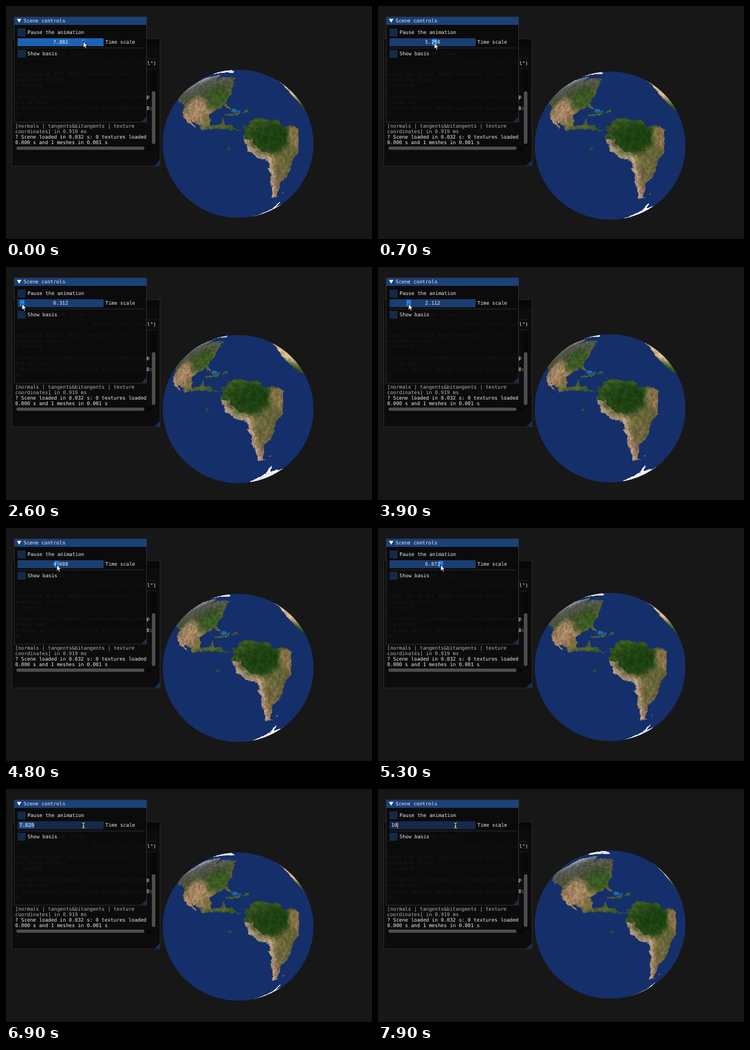
Write an HTML page with a canvas that moves like this. It is 600 px wide and 383 px high and loops after 8000 ms.

```html
<!DOCTYPE html>
<html lang="en">
<head>
<meta charset="utf-8">
<title>Scene controls</title>
<style>
html, body { margin: 0; width: 100%; height: 100%; overflow: hidden; background: #171717; }
canvas, svg { position: absolute; left: 0; top: 0; width: 600px; height: 383px; }
text { font: 8.14px "DejaVu Sans Mono", monospace; fill: #efefef; text-rendering: geometricPrecision; white-space: pre; }
.log .soft { fill: #b4b4b4; }
</style>
</head>
<body>
<canvas id="globe" width="600" height="383"></canvas>
<svg viewBox="0 0 600 383" xmlns="http://www.w3.org/2000/svg">
  <rect y="381" width="600" height="2" fill="#1b1216"/>

  <g class="log">
    <rect x="9.5" y="54" width="243" height="209" fill="#0c0c0c" stroke="#2b2b31"/>
    <rect x="10" y="54.5" width="242" height="12" fill="#080808"/>
    <text x="15" y="63.5">Log</text>
    <text x="67" y="80.5">bottom  Clear</text>
    <text x="143.5" y="97">Filter ("incl,-excl")</text>
    <path d="M15 86.5H247M15 103.5H247" stroke="#1d1d20"/>
    <text x="15" y="115">ready the 32_BIT_INDEX extension is not</text>
    <text x="15" y="124.2">available either.</text>
    <text x="15" y="133.4">? Loading</text>
    <text x="15" y="152.2">'scenes/mixing/thematic/surface/elements/obsp</text>
    <text x="15" y="161.4">ere at 0x1':</text>
    <text x="15" y="170.8">? Scene parsed, vertex count and bounds are 0:</text>
    <text x="15" y="180">ms</text>
    <text class="soft" x="15" y="199.6">[normals | tangents&amp;bitangents | texture</text>
    <text class="soft" x="15" y="208.7">coordinates] in 0.919 ms</text>
    <text x="15" y="218">? Scene loaded in 0.032 s: 0 textures loaded</text>
    <text x="15" y="227.4">0.000 s and 1 meshes in 0.001 s</text>
    <rect x="238" y="104" width="8.5" height="126" fill="#070707"/>
    <rect x="239" y="140" width="6" height="87" rx="3" fill="#4d4d4d"/>
    <rect x="15" y="230" width="223" height="8" fill="#070707"/>
    <rect x="17" y="231" width="210" height="5.5" rx="2.7" fill="#4d4d4d"/>
    <path d="M252 253.5V262.5H243Z" fill="#172f50"/>
  </g>

  <rect x="13.5" y="18" width="217" height="173" fill="#0b0b0b" fill-opacity=".94" stroke="#2f2f37"/>
  <rect x="14" y="18" width="216.5" height="13" fill="#1b4178"/>
  <path d="M18 21.3H25.2L21.6 27.6Z" fill="#fff"/>
  <text x="28.8" y="27.4">Scene controls</text>
  <rect x="19" y="37" width="13" height="13" fill="#152a48"/>
  <text x="35.3" y="46.4">Pause the animation</text>
  <rect id="frame" x="19" y="53" width="141" height="13"/>
  <rect id="grab" y="54.3" width="7.2" height="10.4"/>
  <rect id="pick" x="21.5" y="54.5" width="25" height="10" fill="#27568f"/>
  <text id="value" y="62.4"></text>
  <path id="caret" d="M0 55V64.5" stroke="#f2f2f2" stroke-width=".8"/>
  <text x="162.8" y="62.4">Time scale</text>
  <path d="M19 69H227" stroke="#2d2d34"/>
  <rect x="19" y="72" width="13" height="13" fill="#152a48"/>
  <text x="35.3" y="81.4">Show basis</text>
  <path d="M230 182V190.5H221.5Z" fill="#172f50"/>

  <path id="arrow" d="M0 0V10.6L2.4 8.4L4 12.1L5.8 11.3L4.2 7.7H7.5Z" fill="#fff" stroke="#000"/>
  <g id="beam" fill="none" stroke="#000" stroke-width="2.4">
    <path id="bar" d="M124.5 55.5Q127 55.5 127 57V63Q127 64.5 124.5 64.5M129.5 55.5Q127 55.5 127 57M127 63Q127 64.5 129.5 64.5M125.7 61H128.3"/>
    <g stroke="#fff" stroke-width="1"><use href="#bar"/></g>
  </g>
</svg>
<script>
const $ = id => document.getElementById(id);
const LOOP = 8000, DEG = Math.PI / 180;

// ---- Earth map: coarse lon, lat outlines, roughened by noise ----
const MW = 1080, MH = 540, OCEAN = [21, 47, 107];
const NORTH = [-168,66, -128,70, -95,74, -62,66, -78,58, -65,60, -56,52, -66,44, -76,35, -81,31, -80,25, -83,30,
  -96,29, -98,20, -91,18, -87,21, -88,16, -83,15, -82,9, -77,8, -86,11, -94,16, -105,20, -113,31, -110,23,
  -121,35, -124,48, -152,59];
const SOUTH = [-77,8, -72,12, -62,10.5, -51,4, -50,0, -40,-3, -35,-6, -39,-14, -41,-22, -48,-26, -53,-33, -57,-38,
  -62,-40, -66,-47, -69,-51, -65,-55, -74,-52, -73,-37, -70,-19, -76,-14, -81,-5, -80,1];
const AFRICA = [-6,36, -17,21, -17,14, -8,4.5, 9,4, 20,36];
const GREENLAND = [-45,60, -55,70, -70,78, -30,83, -20,72];
const ANTARCTICA = [-180,-78, -75,-73, -58,-63, -62,-72, -20,-77, 180,-72, 180,-90, -180,-90];
const ANTILLES = [-84,22.5, -75,20.3, -68,18.5];

// land colours at even steps from 80 N to 56 S
const BELTS = ['#e4e8ea', '#555a55', '#4a5436', '#94794f', '#36571f', '#3a5223', '#6f6a3c', '#6f653f', '#7d6550'];

const mapX = lon => (lon + 180) * 3, mapY = lat => (90 - lat) * 3;

function hash(x, y) {
  let h = Math.imul(x, 374761393) ^ Math.imul(y, 668265263);
  h = Math.imul(h ^ (h >>> 13), 1274126177);
  return ((h ^ (h >>> 16)) >>> 0) / 4294967296;
}

function noise(x, y) {
  const i = Math.floor(x), j = Math.floor(y);
  let u = x - i, v = y - j;
  u *= u * (3 - 2 * u);
  v *= v * (3 - 2 * v);
  const a = hash(i, j), b = hash(i + 1, j), c = hash(i, j + 1), d = hash(i + 1, j + 1);
  return a + (b - a) * u + (c - a + (a - b - c + d) * u) * v;
}

function paintMap() {
  const c = document.createElement('canvas');
  c.width = MW;
  c.height = MH;
  const g = c.getContext('2d');
  const trace = pts => {
    g.beginPath();
    for (let i = 0; i < pts.length; i += 2) g.lineTo(mapX(pts[i]), mapY(pts[i + 1]));
  };
  const fill = (pts, style) => {
    trace(pts);
    g.fillStyle = style;
    g.fill();
  };
  const stroke = (pts, style, width) => {
    trace(pts);
    g.strokeStyle = style;
    g.lineWidth = width;
    g.stroke();
  };
  const blob = (color, lon, lat, rx, ry) => {
    g.save();
    g.translate(mapX(lon), mapY(lat));
    g.scale(rx * 3, ry * 3);
    const grad = g.createRadialGradient(0, 0, 0, 0, 0, 1);
    grad.addColorStop(0, color);
    grad.addColorStop(.6, color + 'd0');
    grad.addColorStop(1, color + '00');
    g.fillStyle = grad;
    g.fillRect(-1, -1, 2, 2);
    g.restore();
  };

  const belts = g.createLinearGradient(0, mapY(80), 0, mapY(-56));
  BELTS.forEach((color, i) => belts.addColorStop(i / (BELTS.length - 1), color));
  for (const land of [NORTH, SOUTH, AFRICA]) fill(land, belts);
  g.setLineDash([27, 6]);
  stroke(ANTILLES, '#47602f', 4);
  g.setLineDash([]);
  g.fillRect(mapX(-92), mapY(.5), 4, 4);
  g.fillRect(mapX(-61), mapY(-51), 7, 3);

  g.globalCompositeOperation = 'source-atop';
  blob('#a98866', -109, 36, 16, 15);
  blob('#35571f', -84, 38, 16, 13);
  blob('#1f4412', -63, -4, 20, 13);
  blob('#1b3f10', -57, -6, 11, 10);
  blob('#8d734a', -41, -11, 9, 11);
  blob('#94745a', -69, -45, 7, 11);
  blob('#dfbd90', 0, 24, 30, 16);
  const andes = SOUTH.slice(-12);
  stroke(andes, '#9c805ca0', 32);
  stroke(andes, '#c9b49c80', 18);

  g.globalCompositeOperation = 'source-over';
  for (const ice of [GREENLAND, ANTARCTICA]) fill(ice, '#eef1f4');
  g.globalCompositeOperation = 'destination-over';
  blob('#2377a6', -77.5, 24, 2, 2);
  blob('#1c6196', -75, 22, 2, 1.2);
  return g.getImageData(0, 0, MW, MH).data;
}

// roughen coasts and mottle the land
function buildMap() {
  const src = paintMap(), out = new Uint8ClampedArray(MW * MH * 3);
  const wobble = (x, y) => (noise(x * .3, y * .3) - .5) * 4 + (noise(x * .1, y * .1) - .5) * 6;
  const clamp = (v, max) => Math.min(max, Math.max(0, Math.round(v)));
  for (let y = 0, o = 0; y < MH; y++) for (let x = 0; x < MW; x++, o += 3) {
    const sx = clamp(x + wobble(x, y), MW - 1), sy = clamp(y + wobble(x + 500, y), MH - 1);
    const i = (sy * MW + sx) * 4, a = src[i + 3] / 255;
    const shade = a ? .74 + .36 * noise(x * .18, y * .18 + 40) + .14 * hash(x, y) : 1;
    for (let k = 0; k < 3; k++) out[o + k] = OCEAN[k] * (1 - a) + src[i + k] * a * shade;
  }
  return out;
}

// ---- Globe ----
const CX = 380.5, RX = 123.5, RY = 121.7, DIST = 8, K2 = DIST * DIST - 1;
const LON0 = -84.7, ROLL = 23.4 * DEG, TILT = .5 * DEG, SPIN = [.2, .979, -.03];

function turn([x, y, z], a) {
  const c = Math.cos(a), s = Math.sin(a), t = 1 - c;
  return [[t*x*x + c, t*x*y - s*z, t*x*z + s*y],
          [t*x*y + s*z, t*y*y + c, t*y*z - s*x],
          [t*x*z - s*y, t*y*z + s*x, t*z*z + c]];
}
const mul = (a, b) => a.map(r => [0, 1, 2].map(j => r[0]*b[0][j] + r[1]*b[1][j] + r[2]*b[2][j]));
const POSE = mul(turn([0, 0, 1], ROLL), turn([1, 0, 0], TILT));

const earth = buildMap();
const ctx = $('globe').getContext('2d');
const X0 = 255, BW = 252, BH = 250;
const image = ctx.createImageData(BW, BH);

// cast a ray through each pixel and look the hit point up on the map
function drawGlobe(angle) {
  const cy = 226.5 - .46 * angle, y0 = Math.floor(cy) - 125;
  const [a, b, c] = mul(turn(SPIN, angle * DEG), POSE);
  const px = image.data;
  for (let j = 0, o = 0; j < BH; j++) for (let i = 0; i < BW; i++, o += 4) {
    let x = (X0 + i + .5 - CX) / RX, y = (cy - y0 - j - .5) / RY;
    const r = Math.hypot(x, y), cover = (1 - r) * 122 + .5;
    px[o + 3] = Math.max(0, Math.min(1, cover)) * 255;
    if (cover <= 0) continue;
    if (r > .9999) { x *= .9999 / r; y *= .9999 / r; }
    const q = 1 + (x * x + y * y) / K2;
    const t = (DIST - Math.sqrt(Math.max(0, DIST * DIST - q * K2))) / q;
    const k = t / Math.sqrt(K2), z = DIST - t;
    x *= k;
    y *= k;
    const ex = a[0]*x + b[0]*y + c[0]*z, ey = a[1]*x + b[1]*y + c[1]*z, ez = a[2]*x + b[2]*y + c[2]*z;
    const lon = LON0 + Math.atan2(ex, ez) / DEG, lat = Math.asin(Math.max(-1, Math.min(1, ey))) / DEG;
    const u = ((Math.floor(mapX(lon)) % MW) + MW) % MW, v = Math.min(MH - 1, Math.floor(mapY(lat)));
    const m = (v * MW + u) * 3;
    px[o] = earth[m];
    px[o + 1] = earth[m + 1];
    px[o + 2] = earth[m + 2];
  }
  ctx.clearRect(0, 0, 600, 383);
  ctx.putImageData(image, X0, y0);
}

// ---- Timeline ----
const DRAG = [[0, 7.882], [1300, 3.065], [2100, .5], [2600, .312], [3900, 2.112], [4800, 4.608], [5900, 7.829]];
const PRESS = 200, RELEASE = 6100, EDIT = 6900, ONE = 7400, TEN = 7700;

function dragValue(t) {
  const n = DRAG.findIndex(k => k[0] > t);
  if (n < 0) return DRAG[DRAG.length - 1][1];
  const [t0, v0] = DRAG[n - 1], [t1, v1] = DRAG[n];
  return v0 + (v1 - v0) * (t - t0) / (t1 - t0);
}

const show = (id, on) => $(id).setAttribute('visibility', on ? 'visible' : 'hidden');
const set = (id, attrs) => { for (const k in attrs) $(id).setAttribute(k, attrs[k]); };

function draw(t) {
  const editing = t >= EDIT, dragging = t >= PRESS && t < RELEASE;
  const scale = t >= TEN ? 10 : t >= ONE ? 1 : dragValue(t);
  const label = t >= ONE ? String(scale) : scale.toFixed(3);
  const knob = 22.3 + 13.28 * scale;

  set('frame', { fill: editing ? '#15294a' : dragging ? '#1a3e72' : '#1b62b4' });
  set('grab', { x: knob - 3.6, fill: dragging ? '#2482ee' : '#2272d2' });
  set('value', { x: editing ? 21.8 : 89.6, 'text-anchor': editing ? 'start' : 'middle' });
  $('value').textContent = label;
  set('caret', { transform: `translate(${22.3 + 4.9 * label.length} 0)` });
  set('arrow', { transform: `translate(${knob - .4} ${t < PRESS ? 58.2 : 60.3})` });
  show('grab', !editing);
  show('pick', editing && t < ONE);
  show('caret', t >= ONE);
  show('arrow', !editing);
  show('beam', editing);
  drawGlobe(-16 + 1.2 * scale + .11 * scale * scale + t * 1e-4);
}

let last = -1;
const start = performance.now();
function tick() {
  const t = (performance.now() - start) % LOOP;
  const hold = t < 400 ? 200 : 100;
  const step = Math.floor(t / hold) * hold;
  if (step !== last) draw(last = step);
  requestAnimationFrame(tick);
}
tick();
</script>
</body>
</html>
```
